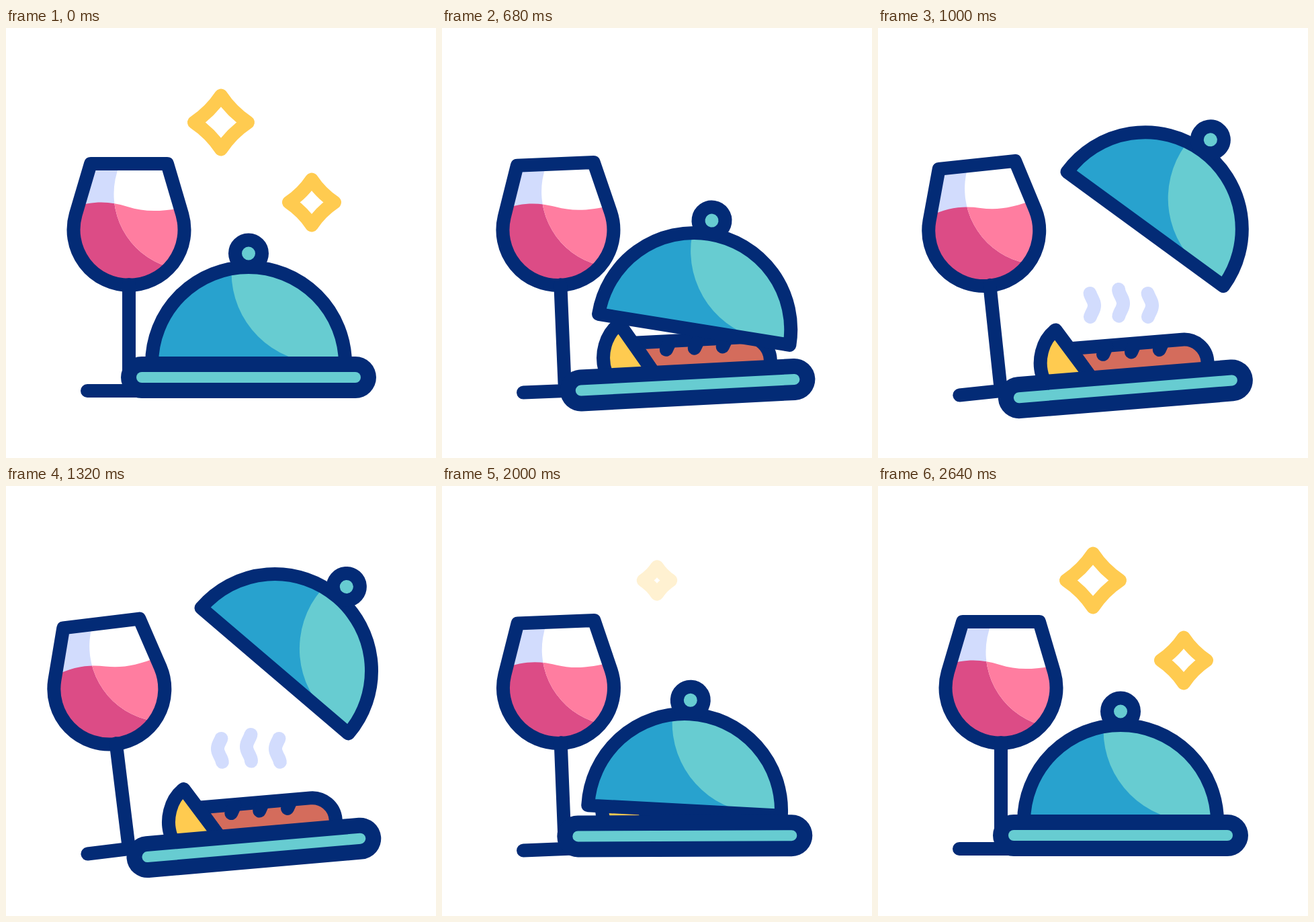
Write an HTML page that moves like this. It is 640x640 px and loops after 3000 ms.

```html
<!DOCTYPE html>
<html lang="en">
<head>
<meta charset="utf-8">
<style>
  html, body { margin: 0; width: 100%; height: 100%; overflow: hidden; background: #fff; }
  svg { display: block; width: 100%; height: 100%; }
  .ink { stroke: #032b76; stroke-width: 20; stroke-linecap: round; stroke-linejoin: round; }
  .star { stroke: #ffcb50; stroke-width: 20; stroke-linejoin: round; fill: none; }
  .steam { stroke: #d2dcfd; stroke-width: 20; stroke-linecap: round; stroke-linejoin: round; fill: none; }
</style>
</head>
<body>
<svg viewBox="0 0 640 640">
  <defs>
    <path id="bowl" d="M126 202H240L262.3 277.5A82.5 82.5 0 1 1 103.7 277.5Z"/>
    <path id="dome" d="M217 500A144 144 0 0 1 505 500Z"/>
    <path id="wine" d="M85 272C125 256 152 257 181 266S235 274 285 263V400H85Z"/>
    <clipPath id="inBowl"><use href="#bowl"/></clipPath>
    <clipPath id="inDome"><use href="#dome"/></clipPath>
    <clipPath id="bowlLight"><circle cx="273.5" cy="247" r="113"/></clipPath>
  </defs>

  <path class="star"/>
  <path class="star"/>

  <g id="glass">
    <g clip-path="url(#inBowl)">
      <path fill="#d2dcfd" d="M90 190H280V400H90Z"/>
      <use class="wine" href="#wine" fill="#dc4c86"/>
      <g clip-path="url(#bowlLight)">
        <path fill="#fff" d="M90 190H290V400H90Z"/>
        <use class="wine" href="#wine" fill="#ff7da0"/>
      </g>
    </g>
    <use href="#bowl" class="ink" fill="none"/>
    <path class="ink" fill="none" d="M183 382V540M121 540H245"/>
  </g>

  <path class="steam"/>
  <path class="steam"/>
  <path class="steam"/>

  <g class="tray">
    <path class="ink" fill="#d46c5c" d="M284 453.5H451A35 35 0 0 1 486 488.5V500H312Z"/>
    <path class="ink" fill="none" d="M338 455l-6 11M380 455l-6 11M422 455l-6 11"/>
    <path class="ink" fill="#ffcb50" d="M264.5 424C245 436 230 468 242 500H312Z"/>
  </g>

  <g id="lid">
    <g clip-path="url(#inDome)">
      <path fill="#28a2ce" d="M200 340H520V510H200Z"/>
      <circle cx="470.5" cy="363.5" r="135" fill="#67ccd1"/>
    </g>
    <use href="#dome" class="ink" fill="none"/>
    <circle class="ink" cx="361" cy="335.5" r="20" fill="#67ccd1"/>
  </g>

  <g class="tray" stroke-linecap="round">
    <path stroke="#032b76" stroke-width="62" d="M202 520H520"/>
    <path stroke="#67ccd1" stroke-width="16" d="M202 520H520"/>
  </g>
</svg>
<script>
const LOOP = 3000;
const all = s => [...document.querySelectorAll(s)];
const [glass, lid] = all('#glass, #lid');
const trays = all('.tray'), wines = all('.wine'), stars = all('.star'), steams = all('.steam');
const clamp = v => Math.min(1, Math.max(0, v));

// Bezier easing (x1,0,x2,1), from 0 to 1 over the given span
function ease(t, start, length, x1 = .3, x2 = .3) {
  const p = clamp((t - start) / length);
  if (p === 0 || p === 1) return p;
  let lo = 0, hi = 1, u;
  for (let i = 0; i < 24; i++) {
    u = (lo + hi) / 2;
    const x = 3 * (1 - u) * (1 - u) * u * x1 + 3 * (1 - u) * u * u * x2 + u ** 3;
    if (x < p) lo = u; else hi = u;
  }
  return u * u * (3 - 2 * u);
}

// Value along [time, value] keys, smoothed by shape
function track(t, keys, shape = p => p) {
  let [t0, v0] = keys[0];
  for (const [t1, v1] of keys) {
    if (t < t1) return v0 + (v1 - v0) * shape(clamp((t - t0) / (t1 - t0)));
    t0 = t1;
    v0 = v1;
  }
  return v0;
}
const sine = p => (1 - Math.cos(Math.PI * p)) / 2;

function drawStar(el, x, y, size, t, delay) {
  const local = t - delay;
  const scale = track(local, [[0, 1], [200, 1.3], [480, 0], [1855, 0], [2195, 1.3], [2500, 1]], sine);
  const r = size * scale, c = r * .4;
  el.setAttribute('d', `M0 ${-r}Q${c} ${-c} ${r} 0Q${c} ${c} 0 ${r}Q${-c} ${c} ${-r} 0Q${-c} ${-c} 0 ${-r}Z`);
  el.setAttribute('transform', `translate(${x} ${y})`);
  el.setAttribute('opacity', track(local, [[200, 1], [480, 0], [1860, 0], [2400, 1]]));
}

function drawSteam(el, x, rise, t) {
  const head = track(t, [[740, 450], [1000, 395], [1320, 376], [1600, 350]]) - rise;
  const tail = track(t, [[800, 450], [1000, 430], [1320, 411], [1600, 350]]) - rise / 5;
  let d = '';
  for (let i = 0; i <= 20; i++) {
    const y = tail + (head - tail) * i / 20;
    d += `${i ? 'L' : 'M'}${x + 3.5 * Math.cos((y - 413 + rise / 2) * Math.PI / 22)} ${y}`;
  }
  const visible = t > 740 && t < 1600;
  el.setAttribute('d', visible ? d : '');
}

function draw(t) {
  const tilt = ease(t, 420, 945) - ease(t, 1530, 1050);
  const slosh = ease(t, 640, 590) - ease(t, 1530, 1100);
  const tray = ease(t, 310, 1080, .5, 0) - ease(t, 1345, 950, .5, 0);
  const lift = ease(t, 516, 745) - ease(t, 1482, 740);
  const shift = ease(t, 478, 710) - ease(t, 1466, 553);

  glass.setAttribute('transform', `rotate(${-7 * tilt} 183 540)`);
  wines.forEach(w => w.setAttribute('transform', `rotate(${-4.4 * slosh} 184 265)`));
  trays.forEach(g => g.setAttribute('transform', `rotate(${-4.95 * tray} 578 438)`));
  lid.setAttribute('transform', `translate(${39 * shift} ${-225 * lift}) rotate(${40.5 * lift} 361 500)`);

  drawStar(stars[0], 320, 140.5, 40, t, 0);
  drawStar(stars[1], 455, 259.5, 34, t, 140);
  drawSteam(steams[0], 318.5, 0, t);
  drawSteam(steams[1], 361.5, 6, t);
  drawSteam(steams[2], 404.5, 0, t);
}

const began = performance.now();
(function tick() {
  draw((performance.now() - began) % LOOP);
  requestAnimationFrame(tick);
})();
</script>
</body>
</html>
```
